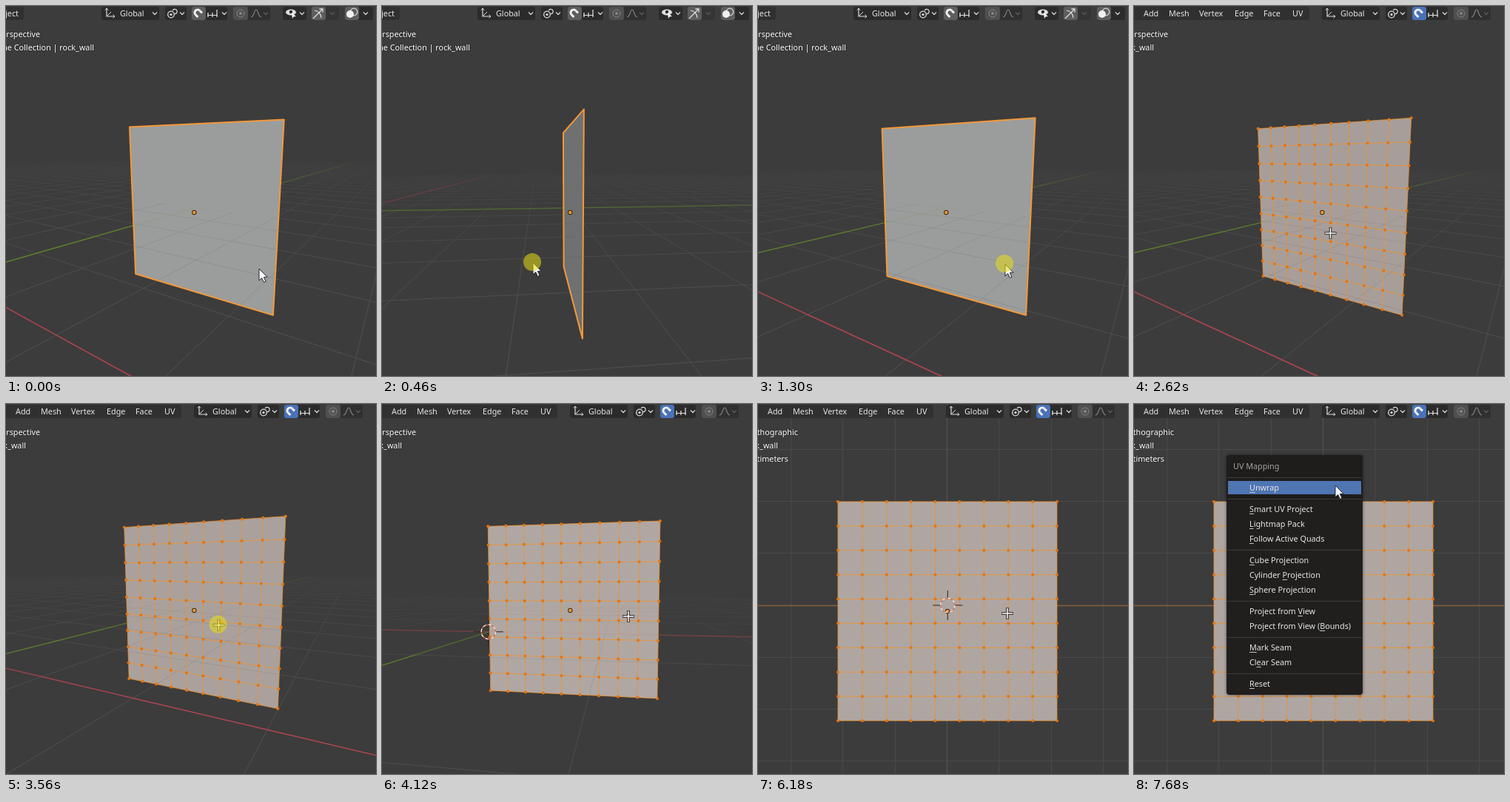
Write an HTML page with a canvas that moves like this. It is 500 px wide and 500 px high and loops after 8 s.

```html
<!DOCTYPE html>
<html lang="en">
<head>
<meta charset="utf-8">
<title>Viewport orbit and unwrap menu</title>
<style>
html, body { margin: 0; width: 100%; height: 100%; overflow: hidden; background: #3c3c3c; }
canvas { display: block; width: 500px; height: 500px; }
</style>
</head>
<body>
<canvas id="stage" width="500" height="500"></canvas>
<script>
const g = document.getElementById('stage').getContext('2d');
const LOOP = 8000, STEP = 93.6;
const EDIT = 2060, ORTHO = 4960, MENU = 7680;

// Scene units: half of the wall is 1 and the wall's centre is the orbit pivot.
const DIST = 3.66, FOCAL = 422.5, CX = 255, CY = 279;
const CELL = 0.48, ORIGIN_Y = -2.39, FLOOR_Z = 0.054, REACH = 44;

const CAMERA = [ // ms, yaw, pitch
  [80, 33.6, 11.8], [520, 85.9, 8.9], [840, 80, 10], [1310, 33.5, 9.9],
  [3270, 33.5, 9.9], [4118, 8.2, 3.45]
];
const MOUSE = [ // ms, x, y
  [80, 342, 355], [520, 198.5, 346.7], [840, 214, 349], [1310, 334, 349],
  [1680, 298, 312], [1780, 297, 311], [1860, 299, 312], [2330, 299, 311],
  [2620, 265.5, 307], [2800, 265.5, 307], [2980, 271, 303], [3270, 271, 303],
  [4118, 333, 287], [6083, 333, 287], [6177, 337, 283], [6920, 271, 150],
  [7200, 273, 111], [7670, 272, 110]
];
const MENU_ITEMS = [ // centre y, label, index of the underlined letter
  [113, 'Unwrap', 0], [142, 'Smart UV Project', 0], [162, 'Lightmap Pack', 0],
  [182, 'Follow Active Quads', 0], [211, 'Cube Projection', 0],
  [231, 'Cylinder Projection', 9], [251, 'Sphere Projection', 0],
  [280, 'Project from View', 13], [300, 'Project from View (Bounds)', 19],
  [329, 'Mark Seam', 0], [349, 'Clear Seam', 2], [378, 'Reset', 0]
];

const clamp = v => Math.max(0, Math.min(1, v));
const smooth = v => (v = clamp(v), v * v * (3 - 2 * v));
const mix = (a, b, p) => a + (b - a) * p;

function track(keys, t) {
  const i = keys.findIndex(k => k[0] > t);
  if (i < 0) return keys[keys.length - 1].slice(1);
  if (i === 0) return keys[0].slice(1);
  const a = keys[i - 1], b = keys[i], p = smooth((t - a[0]) / (b[0] - a[0]));
  return [mix(a[1], b[1], p), mix(a[2], b[2], p)];
}

function path(points, close) {
  g.beginPath();
  points.forEach(([x, y], i) => i ? g.lineTo(x, y) : g.moveTo(x, y));
  if (close) g.closePath();
}
function line(points, color, width = 1) {
  path(points);
  g.strokeStyle = color;
  g.lineWidth = width;
  g.stroke();
}
function disc(x, y, r, color) {
  g.beginPath();
  g.arc(x, y, r, 0, 7);
  g.fillStyle = color;
  g.fill();
}
function ring(x, y, r, color, width = 1, from = 0, to = Math.PI * 2) {
  g.beginPath();
  g.arc(x, y, r, from, to);
  g.strokeStyle = color;
  g.lineWidth = width;
  g.stroke();
}
function box(x, y, w, h, color, r = 3) {
  g.beginPath();
  g.roundRect(x, y, w, h, r);
  g.fillStyle = color;
  g.fill();
}
function text(s, x, y, color = '#e6e6e6', align = 'left', weight = 400) {
  g.font = `${weight} 10.8px "Noto Sans", "Open Sans", sans-serif`;
  g.textAlign = align;
  g.fillStyle = color;
  g.fillText(s, x, y);
}

// Orbit camera: view() gives right, up and depth; toScreen() gives pixels.
function makeCamera(yaw, pitch) {
  const a = yaw * Math.PI / 180, b = pitch * Math.PI / 180;
  const ca = Math.cos(a), sa = Math.sin(a), cb = Math.cos(b), sb = Math.sin(b);
  const view = (x, y, z) => [
    x * ca + y * sa,
    (y * ca - x * sa) * sb + z * cb,
    DIST + (y * ca - x * sa) * cb - z * sb
  ];
  const toScreen = ([r, u, d]) => [CX + FOCAL * r / d, CY - FOCAL * u / d];
  return {
    view, toScreen, facing: ca,
    project: (x, y, z) => toScreen(view(x, y, z)),
    x: DIST * sa * cb, y: -DIST * ca * cb, height: DIST * sb - FLOOR_Z
  };
}

function floorSegment(cam, p, q, rgb, width) {
  const dist = Math.hypot((p[0] + q[0]) / 2 - cam.x, (p[1] + q[1]) / 2 - cam.y, cam.height);
  const alpha = (1 - (1 - cam.height / dist) ** 4) * (1 - smooth((dist - 7) / 15));
  if (alpha < 0.01) return;
  const near = 0.05;
  let a = cam.view(...p, FLOOR_Z), b = cam.view(...q, FLOOR_Z);
  if (a[2] < near && b[2] < near) return;
  const cut = (u, v) => u.map((c, i) => mix(c, v[i], (near - u[2]) / (v[2] - u[2])));
  if (a[2] < near) a = cut(a, b);
  else if (b[2] < near) b = cut(b, a);
  line([cam.toScreen(a), cam.toScreen(b)], `rgba(${rgb},${alpha.toFixed(3)})`, width);
}

// Lines parallel to both floor axes, at one offset from the origin.
function floorLines(cam, offset, alongY, alongX, width) {
  for (let j = -REACH; j < REACH; j++) {
    const s = j * CELL, e = s + CELL;
    floorSegment(cam, [offset, ORIGIN_Y + s], [offset, ORIGIN_Y + e], alongY, width);
    floorSegment(cam, [s, ORIGIN_Y + offset], [e, ORIGIN_Y + offset], alongX, width);
  }
}

function drawFloor(cam) {
  const grey = '82,82,82';
  for (let i = 1; i <= REACH; i++) {
    floorLines(cam, i * CELL, grey, grey, 1);
    floorLines(cam, -i * CELL, grey, grey, 1);
  }
  floorLines(cam, 0, '106,152,42', '184,70,82', 1.5);
}

function fillWall(corners, shade, edit) {
  path(corners, true);
  g.fillStyle = edit ? `rgb(${shade + 11},${shade + 2},${shade - 2})`
                     : `rgb(${shade - 2},${shade + 1},${shade})`;
  g.fill();
}

function drawMesh(project) {
  const N = 9, at = i => -1 + 2 * i / N;
  for (let i = 0; i <= N; i++) {
    const c = at(i), color = 'rgba(240,146,40,0.75)';
    line([project(c, 0, -1), project(c, 0, 1)], color);
    line([project(-1, 0, c), project(1, 0, c)], color);
  }
  for (let i = 0; i <= N; i++)
    for (let j = 0; j <= N; j++) disc(...project(at(i), 0, at(j)), 2, '#e67410');
}

function drawOriginDot(x, y) {
  disc(x, y, 3.2, '#3a2a18');
  disc(x, y, 2.2, '#f0982f');
}

function draw3DCursor(x, y) {
  for (const [dx, dy] of [[1, 0], [-1, 0], [0, 1], [0, -1]])
    line([[x + dx * 9, y + dy * 9], [x + dx * 20, y + dy * 20]], '#262220');
  ring(x, y, 9.7, '#cb6c58', 1.3);
  g.setLineDash([3.8, 3.8]);
  ring(x, y, 9.7, '#f5efe8', 1.3);
  g.setLineDash([]);
}

function drawPerspective(cam, edit) {
  drawFloor(cam);
  const corners = [[-1, 1], [1, 1], [1, -1], [-1, -1]].map(([x, z]) => cam.project(x, 0, z));
  fillWall(corners, Math.round(105.6 + 60 * cam.facing), edit);

  // The floor in front of the wall shows faintly over its lower half.
  g.save();
  path([[-1, FLOOR_Z], [1, FLOOR_Z], [1, -1], [-1, -1]].map(([x, z]) => cam.project(x, 0, z)), true);
  g.clip();
  g.globalAlpha = 0.2;
  drawFloor(cam);
  g.restore();

  if (edit) drawMesh(cam.project);
  else {
    g.lineJoin = 'round';
    path(corners, true);
    g.strokeStyle = '#f4983a';
    g.lineWidth = 2;
    g.stroke();
  }
  drawOriginDot(254.3, 279);
  if (edit) {
    const origin = cam.view(0, ORIGIN_Y, FLOOR_Z);
    if (origin[2] > 0.1) draw3DCursor(...cam.toScreen(origin));
  }
}

function drawOrthographic() {
  const project = (x, y, z) => [256 + 148 * x, 280 - 148 * z];
  for (let i = -3; i <= 3; i++) {
    const x = Math.round(256 + i * 70.3) - 0.5, y = Math.round(272.5 + i * 70.3) - 0.5;
    line([[x, 0], [x, 500]], i ? '#4a4a4a' : '#555');
    line([[0, y], [500, y]], '#4a4a4a');
  }
  line([[0, 272.5], [500, 272.5]], '#8a6038', 1.4);
  fillWall([[108, 132], [404, 132], [404, 428], [108, 428]], 164, true);
  drawMesh(project);
  drawOriginDot(256, 280);
  draw3DCursor(256.3, 272);
}

function chevron(x, color = '#d8d8d8') {
  line([[x - 3, 8.5], [x, 11.5], [x + 3, 8.5]], color, 1.2);
}

function drawHeader(edit) {
  const dark = '#2b2b2b', lit = '#5e5e5e', ink = '#dedede', dim = '#858585';
  if (edit) {
    box(-4, 1, 241, 18, '#303030');
    [['Add', 13], ['Mesh', 47], ['Vertex', 88], ['Edge', 136], ['Face', 175], ['UV', 214]]
      .forEach(([s, x]) => text(s, x, 14));
  } else {
    box(-4, 1, 28, 18, '#303030');
    text('Object', 17, 14, '#e6e6e6', 'right');
  }

  g.save();
  if (edit) g.translate(125, 0);
  box(129, 1, 78, 18, dark);
  line([[136, 3], [136, 14], [147, 14]], ink, 1.2);
  line([[134, 5.5], [136, 3], [138, 5.5]], ink);
  line([[144.5, 12], [147, 14], [144.5, 16]], ink);
  line([[136, 14], [142, 8]], ink);
  text('Global', 154, 14);
  chevron(201);

  box(215, 1, 29, 18, dark);
  ring(223, 11.5, 4.3, ink, 1.3);
  disc(223, 11.5, 1.6, ink);
  ring(228, 7.5, 3.2, ink, 1.2, -2.6, 1.6);
  chevron(238);

  box(251, 1, 48, 18, dark);
  box(251, 1, 19, 18, edit ? '#4a72b8' : lit);
  ring(259, 9, 4, '#f0f0f0', 3, Math.PI * 0.75, Math.PI * 1.75);
  line([[256.2, 11.8], [259.4, 15]], '#f0f0f0', 3);
  line([[261.8, 6.2], [265, 9.4]], '#f0f0f0', 3);
  line([[272, 12.5], [286, 12.5]], ink);
  [273, 279, 285].forEach((x, i) => line([[x, i === 2 ? 5 : 9], [x, 15]], ink, 1.3));
  chevron(295);

  box(307, 1, 50, 18, '#303030');
  box(307, 1, 20, 18, '#505050');
  ring(317, 10, 5, dim);
  disc(317, 10, 2, dim);
  g.beginPath();
  g.moveTo(331, 15);
  g.bezierCurveTo(336, 14, 335, 5, 338, 5);
  g.bezierCurveTo(341, 5, 340, 14, 345, 15);
  g.strokeStyle = dim;
  g.lineWidth = 1.2;
  g.stroke();
  chevron(351, '#5c5c5c');

  if (!edit) {
    box(374, 1, 32, 18, dark);
    g.beginPath();
    g.ellipse(385, 8.5, 7, 4, 0, 0, 7);
    g.fillStyle = ink;
    g.fill();
    disc(385, 8, 2.2, dark);
    path([[386, 9], [392, 14], [388.5, 14.5], [387, 17]], true);
    g.fillStyle = '#fff';
    g.fill();
    chevron(400);

    box(413, 1, 37, 18, '#353535');
    box(413, 1, 19, 18, lit);
    ring(416, 16, 10, ink, 1.2, -1.5, 0);
    line([[415, 17], [428, 4]], ink, 1.3);
    line([[423.5, 4], [428, 4], [428, 8.5]], ink, 1.3);
    chevron(441, '#5c5c5c');

    box(458, 1, 38, 18, dark);
    box(458, 1, 19, 18, lit);
    ring(470, 8, 4.8, ink, 1.2);
    disc(465, 11, 5, '#f2f2f2');
    chevron(486);
  }
  g.restore();
}

function drawInfo(edit, ortho) {
  g.save();
  g.shadowColor = 'rgba(0,0,0,0.6)';
  g.shadowBlur = 2;
  const label = (s, right, y) => text(s, right, y, '#fff', 'right', 500);
  ortho ? label('Front Orthographic', 54, 42) : label('User Perspective', 46, 42);
  edit ? label('(1) rock_wall', 27, 60) : label('(1) Scene Collection | rock_wall', 119, 60);
  if (ortho) label('10 Centimeters', 41, 78);
  g.restore();
}

function drawMenu() {
  g.save();
  g.shadowColor = 'rgba(0,0,0,0.5)';
  g.shadowBlur = 4;
  box(125, 69, 184, 324, 'rgba(30,29,28,0.97)', 4);
  g.restore();
  text('UV Mapping', 134, 88, '#a3a3a3');
  [99, 128, 197, 266, 315, 364].forEach(y => line([[126, y + 0.5], [308, y + 0.5]], '#3d3c3b'));
  box(127, 104, 180, 18, '#4f75b3', 0);
  for (const [y, label, key] of MENU_ITEMS) {
    text(label, 156, y + 4);
    const x = 156 + g.measureText(label.slice(0, key)).width;
    const w = g.measureText(label[key]).width;
    line([[x, y + 6.5], [x + w, y + 6.5]], '#c4c4c4');
  }
}

function drawArrow(x, y) {
  path([[0, 0], [0, 16], [3.7, 12.6], [6.4, 18.4], [9, 17.2], [6.4, 11.5], [11, 11.2]]
    .map(([dx, dy]) => [x + dx, y + dy]), true);
  g.fillStyle = '#f4f6fa';
  g.fill();
  g.strokeStyle = '#22252c';
  g.lineWidth = 1;
  g.stroke();
}

function drawCross(x, y) {
  for (const [color, width, arm] of [['#2c2826', 3.6, 8], ['#fff', 1.5, 7.3]]) {
    line([[x - arm, y], [x + arm, y]], color, width);
    line([[x, y - arm], [x, y + arm]], color, width);
  }
}

function draw(t, stepped) {
  const edit = t >= EDIT, ortho = t >= ORTHO, menu = t >= MENU;
  g.fillStyle = '#3c3c3c';
  g.fillRect(0, 0, 500, 500);
  if (ortho) drawOrthographic();
  else drawPerspective(makeCamera(...track(CAMERA, stepped)), edit);
  drawInfo(edit, ortho);
  drawHeader(edit);
  if (menu) drawMenu();

  const [x, y] = track(MOUSE, stepped);
  if (edit && !menu) drawCross(x, y);
  else drawArrow(x, y);
  const dragging = (t >= 80 && t < 1400) || (t >= 3360 && t < 4100);
  if (dragging) disc(x - 1, y - 1, 12, 'rgba(232,224,20,0.54)');
}

let shown = '';
function frame() {
  const t = performance.now() % LOOP;
  const step = Math.floor((t + 14) / STEP);
  const key = [step, t >= EDIT, t >= ORTHO, t >= MENU].join();
  if (key !== shown) {
    shown = key;
    draw(t, step * STEP);
  }
  requestAnimationFrame(frame);
}
frame();
</script>
</body>
</html>
```
